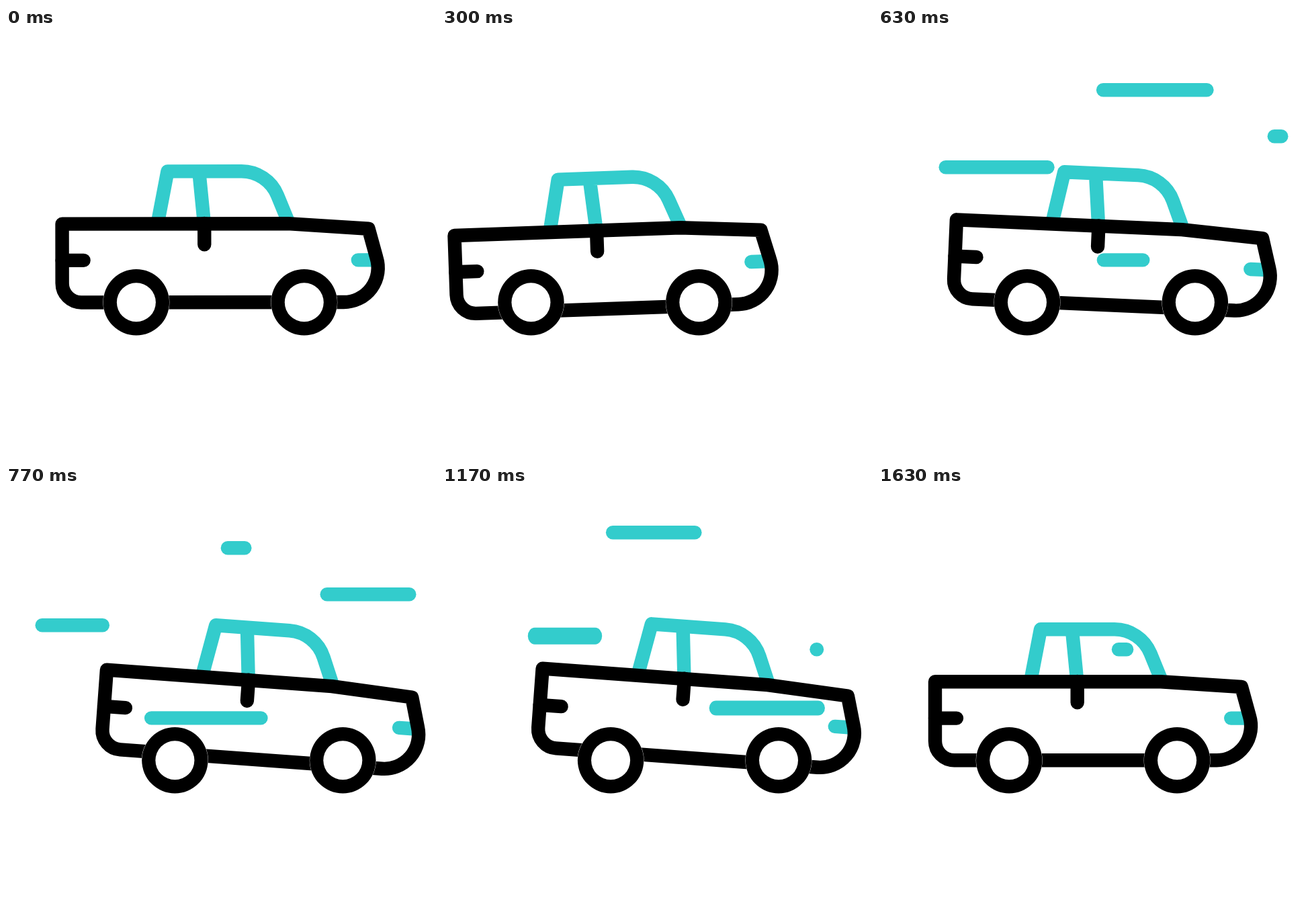
An HTML page with a canvas that plays this animation: 640 by 640 pixels, repeating every 1670 ms.

```html
<!DOCTYPE html>
<html lang="en">
<head>
<meta charset="utf-8">
<title>Pickup truck</title>
<style>
html, body { margin: 0; width: 100%; height: 100%; overflow: hidden; background: #fff; }
canvas { display: block; width: 100vw; height: 100vh; }
</style>
</head>
<body>
<canvas id="stage" width="640" height="640"></canvas>
<script>
const ctx = document.getElementById('stage').getContext('2d');
const LOOP = 1670, STEPS = 50, STEP = 100 / 3;
const TEAL = '#33cccc', BLACK = '#000', STROKE = 20.4;

// Tracks of [step, value], eased between neighbours
const shiftX = [[0, 0], [12.1, -68.2], [23.65, 56.2], [35.4, 56.2], [49.2, 0]];
const shiftY = [[5, 0], [12, 11.8], [27.8, -3], [35, -3], [43, 1], [49.2, 0]];
const tilt = [[0, 0], [9, -2], [12.2, -2], [24, 4.17], [38.6, 4.17], [49.2, 0]];

const LINE = 200, GROW = 9.15, SHRINK = 8.2;
const wind = [
  { x: 529.9, y: 92.3, start: 10.73 },
  { x: 253.7, y: 207.2, start: 12.73 },
  { x: 394.3, y: 345.4, start: 15.73 },
  { x: 600.3, y: 161.2, start: 17.73 },
  { x: 560.9, y: 330.5, start: 28.73, stretch: 1.07 },
  { x: 376.4, y: 69.2, start: 29.74 },
  { x: 228, y: 223.3, start: 30.73, stretch: 1.22 },
  { x: 558, y: 243.2, start: 34.73, delay: 7.3 }
];

const cab = new Path2D('M227 291L242 213.3H352A57.8 57.8 0 0 1 405.5 249.2L422.6 291M288.8 213.3L296.4 291');
const headlight = new Path2D('M525.2 345.6H552');
const body = new Path2D('M85 291.3H421L541 299L552.9 342.4A51 51 0 0 1 504 408.2H113.5A28.5 28.5 0 0 1 85 379.7Z');
const details = new Path2D('M85 345.6H117M296.7 291V322.2');

function ease(x) {
  x = Math.min(1, Math.max(0, x));
  return x * x * (3 - 2 * x);
}

function valueAt(track, n) {
  let value = track[0][1];
  for (let i = 1; i < track.length; i++) {
    const [a, from] = track[i - 1], [b, to] = track[i];
    if (n >= a) value = from + (to - from) * ease((n - a) / (b - a));
  }
  return value;
}

function stroke(path, color, cap) {
  ctx.strokeStyle = color;
  ctx.lineCap = cap;
  ctx.stroke(path);
}

function drawBody(n) {
  ctx.save();
  ctx.translate(320 + valueAt(shiftX, n), 403 + valueAt(shiftY, n));
  ctx.rotate(valueAt(tilt, n) * Math.PI / 180);
  ctx.translate(-320, -403);
  stroke(cab, TEAL, 'butt');
  stroke(headlight, TEAL, 'round');
  stroke(body, BLACK, 'round');
  stroke(details, BLACK, 'round');
  ctx.restore();
}

function disc(x, r, color) {
  ctx.fillStyle = color;
  ctx.beginPath();
  ctx.arc(x, 408.3, r, 0, 2 * Math.PI);
  ctx.fill();
}

function drawWheel(x) {
  disc(x, 49.5, '#fff');
  disc(x, 49.2, BLACK);
  disc(x, 29, '#fff');
}

function drawWind({ x, y, start, delay = 5.9, stretch = 1 }, step) {
  const age = step - start;
  const head = LINE * ease(age / GROW);
  const tail = LINE * ease((age - delay) / SHRINK);
  if (head - tail < 0.5) return;
  const path = new Path2D();
  path.moveTo(x - tail, 0);
  path.lineTo(x - head, 0);
  ctx.save();
  ctx.translate(0, y);
  ctx.scale(1, stretch);
  stroke(path, TEAL, 'round');
  ctx.restore();
}

function draw(time) {
  const step = Math.min(STEPS - 1, Math.floor((time % LOOP + 4) / STEP));
  const n = (step + 1) % STEPS; // the truck's cycle leads the loop by one step
  ctx.fillStyle = '#fff';
  ctx.fillRect(0, 0, 640, 640);
  ctx.lineWidth = STROKE;
  ctx.lineJoin = 'round';
  drawBody(n);
  const x = valueAt(shiftX, n);
  drawWheel(195.2 + x);
  drawWheel(445.1 + x);
  wind.forEach(line => drawWind(line, step));
}

function tick(now) {
  draw(now);
  requestAnimationFrame(tick);
}

draw(0);
requestAnimationFrame(tick);
</script>
</body>
</html>
```
